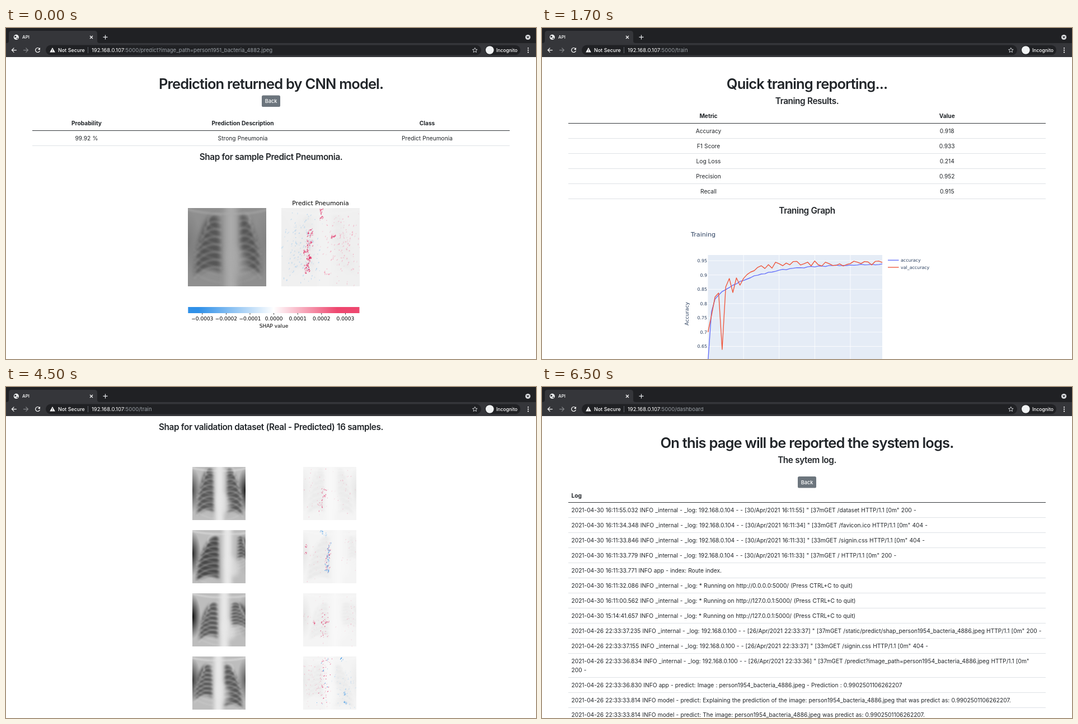
An HTML page with a canvas for the animation above (8 s loop, 947x592 px).

```html
<!DOCTYPE html>
<html lang="en">
<head>
<meta charset="utf-8">
<title>API</title>
<style>
  html, body { margin: 0; width: 100%; height: 100%; overflow: hidden; background: #fff; }
  #stage { position: relative; width: 947px; height: 592px; overflow: hidden; }
  .scene, svg, canvas { position: absolute; left: 0; top: 0; }
  .scene { opacity: 0; }
  text { font: 430 10.2px Inter, sans-serif; word-spacing: .3px; fill: #212529; white-space: pre; }
  .h1 { font-size: 25.5px; font-weight: 560; letter-spacing: -.035em; }
  .h4 { font-size: 15.3px; font-weight: 560; letter-spacing: -.026em; }
  .th { font-weight: 700; }
  .btn { font-size: 9.2px; font-weight: 500; fill: #fff; }
  .bar { font-size: 8.9px; fill: #9aa0a6; }
  .lit { fill: #fff; font-weight: 500; }
  .url { font-size: 9.5px; fill: #9aa0a6; word-spacing: 0; }
  .mpl { font: 9.04px "DejaVu Sans", sans-serif; fill: #000; word-spacing: 0; }
  .plot { font: 7.9px "DejaVu Sans", sans-serif; fill: #2a3f5f; word-spacing: 0; }
</style>
</head>
<body>
<div id="stage"></div>
<script>
const W = 947, H = 592, LOOP = 8000, MID = 473.5;
const STEPS = [[0, 'predict'], [500, 'train'], [2500, 'predict'], [4500, 'samples'], [6500, 'logs']];
const stage = document.getElementById('stage');

const text = (x, y, s, cls = '', anchor = 'middle', more = '') =>
  `<text x="${x}" y="${y}" class="${cls}" text-anchor="${anchor}" ${more}>${s}</text>`;
const rect = (x, y, w, h, fill, more = '') =>
  `<rect x="${x}" y="${y}" width="${w}" height="${h}" fill="${fill}" ${more}/>`;
const path = (d, stroke, width = 1, more = '') =>
  `<path d="${d}" fill="none" stroke="${stroke}" stroke-width="${width}" ${more}/>`;
const circle = (x, y, r, fill) => `<circle cx="${x}" cy="${y}" r="${r}" fill="${fill}"/>`;
const svg = body => `<svg width="${W}" height="${H}" viewBox="0 0 ${W} ${H}">${body}</svg>`;
const rule = (y, tone = '#dee2e6') => rect(47, y, 853, 1, tone);
const headRule = y => rule(y, '#33373b');
const button = y => rect(457, y, 33, 20.5, '#6c757d', 'rx="2.6"') + text(MID, y + 13.6, 'Back', 'btn');

function seeded(n) {
  return () => {
    n = (n + 0x6d2b79f5) | 0;
    let t = Math.imul(n ^ (n >>> 15), 1 | n);
    t = (t + Math.imul(t ^ (t >>> 7), 61 | t)) ^ t;
    return ((t ^ (t >>> 14)) >>> 0) / 4294967296;
  };
}

// Browser frame
function frame() {
  const dots = [36, 39.7, 43.4].map(y => circle(933, y, 1.1, '#fff')).join('');
  return rect(0, 0, W, 27, '#202124') + rect(0, 27, W, 25, '#35363a') +
    '<path d="M1 27q4 0 4-4V10q0-5 5-5h148q5 0 5 5v13q0 4 4 4z" fill="#35363a"/>' +
    circle(18.3, 16.4, 4.6, '#f1f3f4') +
    '<path d="M15 14.5l2.5-.8 1.2 1.8-1.4 1.6-2 .2zM18.5 18l2-.8 1 1.3-1.6 1.5z" fill="#35363a"/>' +
    text(29, 19.4, 'API', 'bar lit', 'start', 'style="font-size:8px"') +
    path('M150 14l5 5m0-5l-5 5', '#fff', 1.1) +
    path('M173.5 16.4h8M177.5 12.4v8', '#e8eaed', 1.2) +
    circle(932.5, 16.5, 4.6, '#d5d7da') + '<path d="M930 15.2h5l-2.5 3.2z" fill="#202124"/>' +
    path('M18.8 39.6h-8.4M14.4 35.6l-4 4 4 4', '#fff', 1.2) +
    path('M31 39.6h8.4M35.4 35.6l4 4-4 4', '#85878a', 1.2) +
    path('M59.7 36.9a4 4 0 1 0 .8 3.7', '#fff', 1.2) + '<path d="M61 35v4h-4z" fill="#fff"/>' +
    rect(71, 30.5, 778, 18, '#202124', 'rx="9"') +
    '<path d="M83 35l4.8 8.4h-9.6z" fill="#fff"/>' + path('M83 38v2.6m0 .8v1', '#202124', .9) +
    text(93, 42.8, 'Not Secure', 'bar lit', 'start') + rect(146, 34, 1, 11, '#5f6368') +
    path('M837.8 35.4l1.3 2.8 3 .3-2.3 2 .7 3-2.7-1.6-2.7 1.6.7-3-2.3-2 3-.3z', '#dadce0', .9) +
    rect(856, 30.8, 63, 17.4, '#202124', 'rx="8.7"') + circle(864.3, 39.5, 7.3, '#f1f3f4') +
    text(876, 42.8, 'Incognito', 'bar lit', 'start', 'style="font-size:8.5px"') + dots;
}
const address = tail =>
  text(153, 42.9, `<tspan fill="#fff">192.168.0.107</tspan>:5000/${tail}`, 'url', 'start');

// Chest pictures, in units of 0..100. Lung: [apex x, apex y, inner x, outer x, base y]
function lungPath([ax, ay, inX, outX, base]) {
  const p = new Path2D();
  p.moveTo(ax, ay);
  p.bezierCurveTo(ax + (outX - ax) * .45, ay, outX, base - 45, outX, base);
  p.quadraticCurveTo((inX + outX) / 2, base - 16, inX, base - 4);
  p.bezierCurveTo(inX, base - 30, inX, ay + 18, ax + (inX - ax) * .6, ay + 3);
  p.closePath();
  return p;
}

function sideShade(c, x, alpha) {
  const g = c.createRadialGradient(x, 40, 0, x, 40, 16);
  g.addColorStop(0, `rgba(0,0,0,${alpha})`);
  g.addColorStop(1, 'rgba(0,0,0,0)');
  c.save();
  c.translate(0, -60);
  c.scale(1, 2.6);
  c.fillStyle = g;
  c.fillRect(0, 0, 100, 100);
  c.restore();
}

function xray(c, o) {
  const px = c.getTransform().a;
  const blur = u => { c.filter = `blur(${u * px}px)`; };
  c.fillStyle = o.body;
  c.fillRect(0, 0, 100, 100);
  sideShade(c, 0, o.shade[0]);
  sideShade(c, 100, o.shade[1]);
  blur(3);
  c.fillStyle = o.lung;
  o.lungs.forEach(l => c.fill(lungPath(l)));
  blur(4);
  c.fillStyle = o.bright;
  c.fillRect(o.spine - 8, -10, 16, 120);
  c.globalAlpha = .6;
  c.beginPath(); c.ellipse(o.spine + 8, 68, 12, 20, -.3, 0, 7); c.fill();
  blur(1);
  c.strokeStyle = o.bright;
  c.lineCap = 'round';
  for (const [, ay, inX, outX, base] of o.lungs) {
    const mid = (inX + outX) / 2, gap = (base - ay) / 8;
    for (let i = 0; i < 8; i++) {
      const y = ay + i * gap, end = inX + (outX - inX) * Math.min(1, .5 + i * .13);
      c.globalAlpha = .28;
      c.lineWidth = 3.2;
      c.beginPath(); c.moveTo(inX, y); c.quadraticCurveTo(mid, y - 6, end, y + 12); c.stroke();
      c.globalAlpha = .15;
      c.beginPath(); c.moveTo(inX, y + 18); c.quadraticCurveTo(mid, y + 17, end, y + 6); c.stroke();
    }
    c.globalAlpha = .5;
    c.beginPath(); c.moveTo(o.spine, 7);
    c.quadraticCurveTo(mid, 9, outX + Math.sign(outX - inX) * 12, 1); c.stroke();
  }
  c.globalAlpha = 1;
  c.filter = 'none';
}

const RED = '#e0245e', PINK = '#f58aa8', BLUE = '#1e88e5', SKY = '#8fc4ef';

// Pale haze over each lung, a strong streak beside the spine, and a few hot spots
function specks(c, o, seed) {
  const rnd = seeded(seed), bell = () => rnd() + rnd() + rnd() - 1.5;
  const dot = (x, y, tone, r, alpha) => {
    c.fillStyle = tone;
    c.globalAlpha = alpha * (.3 + .7 * rnd());
    c.beginPath();
    c.ellipse(x, y, r * (.5 + rnd()), r * (.4 + rnd() * .4), -.6 - rnd(), 0, 7);
    c.fill();
  };
  o.lungs.forEach(([ax, ay, inX, outX, base], side) => {
    for (let i = 0; i < o.haze; i++)
      dot((inX + outX) / 2 + bell() * 26, (ay + base) / 2 + bell() * 45, o.pale[side], 1, .55);
  });
  const [x0, y0, x1, y1] = o.streak;
  for (let i = 0; i < o.strong; i++) {
    const k = rnd();
    dot(x0 + (x1 - x0) * k + bell() * o.wide, y0 + (y1 - y0) * k, rnd() < o.blue ? BLUE : RED, 1.05, .85);
  }
  for (const [x, y, tone] of o.spots)
    for (let i = 0; i < 9; i++) dot(x + bell() * 3, y + bell() * 4, tone, .95, .85);
  c.globalAlpha = 1;
}

function picture(parent, x, y, size, paint) {
  const cv = document.createElement('canvas'), c = cv.getContext('2d');
  cv.width = cv.height = size;
  cv.style.left = x + 'px';
  cv.style.top = y + 'px';
  c.scale(size / 100, size / 100);
  paint(c);
  parent.append(cv);
}

function pair(parent, x1, x2, y, size, chest, seed) {
  picture(parent, x1, y, size, c => xray(c, chest));
  picture(parent, x2, y, size, c => {
    xray(c, chest);
    c.fillStyle = 'rgba(250,250,250,.91)';
    c.fillRect(0, 0, 100, 100);
    specks(c, chest, seed);
  });
}

const MAIN = {
  body: '#8f8f8f', lung: '#555', bright: '#ababab', shade: [.15, .1], spine: 55,
  lungs: [[33, 9, 42, 9, 87], [66, 7, 66, 93, 87]],
  pale: [SKY, PINK], haze: 130, streak: [38, 26, 33, 84], strong: 75, wide: 4, blue: 0,
  spots: [[66, 37, RED], [51, 3, RED], [51, 12, RED], [34, 45, RED], [31, 56, RED], [58, 83, PINK]]
};
const bright = o => ({ body: '#bdbdbd', lung: '#585858', bright: '#e8e8e8', pale: [PINK, PINK], spots: [], ...o });
const SAMPLES = [
  bright({
    spine: 51, shade: [.6, .85], lungs: [[32, 2, 41, 9, 90], [68, 2, 65, 94, 92]],
    haze: 30, streak: [40, 40, 34, 84], strong: 30, wide: 8, blue: 0
  }),
  bright({
    spine: 66, shade: [.8, .1], lung: '#484848', lungs: [[46, 11, 50, 8, 96], [88, 11, 86, 106, 60]],
    haze: 24, streak: [49, 24, 45, 80], strong: 75, wide: 4, blue: .7,
    spots: [[5, 30, RED], [5, 42, RED], [35, 3, BLUE], [43, 10, SKY]]
  }),
  bright({
    spine: 60, shade: [.95, .3], lungs: [[42, 17, 48, 13, 88], [78, 17, 73, 107, 68]],
    haze: 28, streak: [38, 28, 40, 84], strong: 34, wide: 9, blue: 0, spots: [[21, 55, RED]]
  }),
  bright({
    spine: 49, shade: [.7, .5], lungs: [[28, 15, 38, 5, 82], [62, 15, 60, 94, 98]],
    pale: [PINK, SKY], haze: 60, streak: [43, 2, 38, 90], strong: 60, wide: 12, blue: .15,
    spots: [[72, 5, BLUE], [78, 70, BLUE], [80, 88, BLUE]]
  })
];

function predict() {
  const stops = [[6, '#2f90e8'], [50, '#fff'], [87, '#ee476f']]
    .map(([o, t]) => `<stop offset="${o}%" stop-color="${t}"/>`).join('');
  const ticks = [-3, -2, -1, 0, 1, 2, 3].map(n => {
    const x = 478.6 + n * 42.6;
    return rect(x - .4, 510, .8, 2.5, '#000') +
      text(x, 522.8, (n < 0 ? '\u2212' : '') + Math.abs(n / 1e4).toFixed(4), 'mpl');
  }).join('');
  const row = (y, cells, cls) => cells.map((s, i) => text([144, 423, 752.5][i], y, s, cls)).join('');
  return address('predict?image_path=person1951_bacteria_4882.jpeg') +
    text(MID, 109, 'Prediction returned by CNN model.', 'h1') + button(120.5) +
    row(173.7, ['Probability', 'Prediction Description', 'Class'], 'th') + headRule(183) +
    row(200.6, ['99.92 %', 'Strong Pneumonia', 'Predict Pneumonia']) + rule(210) +
    text(MID, 236, 'Shap for sample Predict Pneumonia.', 'h4') +
    text(562, 317, 'Predict Pneumonia', 'mpl', 'middle', 'style="font-size:10.85px"') +
    `<linearGradient id="scale">${stops}</linearGradient>` +
    rect(325.3, 499, 306.2, 11, 'url(#scale)') + ticks + text(478.5, 535.6, 'SHAP value', 'mpl');
}

// Chart heights per epoch: a settling curve with seeded jitter
function curves() {
  const rnd = seeded(5), jitter = a => (rnd() * 2 - 1) * a;
  const start = [544, 514, 481, 474, 575, 463, 448, 473, 447, 460];
  const epochs = [...Array(50).keys()];
  return {
    acc: epochs.map(i => 422 + 72 * Math.exp(-i / 11) + 103 * Math.exp(-1.7 * i) + jitter(1)),
    val: epochs.map(i => start[i] || 421 + 26 * Math.exp((10 - i) / 4) + jitter(i < 14 ? 1 : 5))
  };
}
const series = (ys, tone) => path(
  'M' + ys.map((y, i) => `${(296.5 + i * 6.36).toFixed(1)} ${y.toFixed(1)}`).join('L'), tone, 1.35, 'stroke-linejoin="round"');

function train() {
  const rows = [['Accuracy', '0.918'], ['F1 Score', '0.933'], ['Log Loss', '0.214'], ['Precision', '0.952'], ['Recall', '0.915']]
    .map(([k, v], i) => text(297.5, 188 + i * 27, k) + text(723.7, 188 + i * 27, v) + rule(197 + i * 27)).join('');
  let grid = '';
  for (let i = 0; i < 7; i++) {
    const y = 416.2 + i * 25.55;
    grid += rect(296.5, y - .4, 311.5, .8, '#fff') + text(295, y + 2.9, +(.95 - i * .05).toFixed(2), 'plot', 'end');
  }
  for (let i = 1; i < 5; i++) grid += rect(296.1 + i * 63.6, 406, .8, 186, '#fff');
  const key = (y, name, tone) => path(`M618 ${y}h19.5`, tone, 1.35) + text(641, y + 3, name, 'plot', 'start');
  const { acc, val } = curves();
  return address('train') + text(MID, 109, 'Quick traning reporting...', 'h1') +
    text(MID, 135.6, 'Traning Results.', 'h4') +
    text(297.5, 161, 'Metric', 'th') + text(723.7, 161, 'Value', 'th') + headRule(170) + rows +
    text(MID, 331.5, 'Traning Graph', 'h4') +
    text(266, 373, 'Training', 'plot', 'start', 'style="font-size:11.2px"') +
    rect(296.5, 406, 311.5, 186, '#e5ecf6') + grid +
    text(0, 0, 'Accuracy', 'plot', 'middle', 'style="font-size:9.2px" transform="translate(261.5 511) rotate(-90)"') +
    series(acc, '#636efa') + series(val, '#ef553b') +
    key(415.3, 'accuracy', '#636efa') + key(428, 'val_accuracy', '#ef553b');
}

const samples = () => address('train') +
  text(MID, 77, 'Shap for validation dataset (Real - Predicted) 16 samples.', 'h4');

function logs() {
  const web = (day, time, ip, call, code) =>
    `2021-04-${day} ${time} INFO _internal - _log: 192.168.0.${ip} - - [${day}/Apr/2021 ${time.slice(0, 8)}] ` +
    `" [${code === 404 ? 33 : 37}mGET ${call} HTTP/1.1 [0m"` + (code ? ` ${code} -` : '');
  const run = (time, host) =>
    `2021-04-30 ${time} INFO _internal - _log: * Running on http://${host}:5000/ (Press CTRL+C to quit)`;
  const img = 'person1954_bacteria_4886.jpeg', score = '0.9902501106262207';
  const model = '2021-04-26 22:33:33.814 INFO model - predict: ';
  const lines = [
    web(30, '16:11:55.032', 104, '/dataset', 200),
    web(30, '16:11:34.348', 104, '/favicon.ico', 404),
    web(30, '16:11:33.846', 104, '/signin.css', 404),
    web(30, '16:11:33.779', 104, '/', 200),
    '2021-04-30 16:11:33.771 INFO app - index: Route index.',
    run('16:11:32.086', '0.0.0.0'), run('16:11:00.562', '127.0.0.1'), run('15:14:41.657', '127.0.0.1'),
    web(26, '22:33:37.235', 100, '/static/predict/shap_' + img, 200),
    web(26, '22:33:37.155', 100, '/signin.css', 404),
    web(26, '22:33:36.834', 100, '/predict?image_path=' + img, 0) + '\n200 -',
    `2021-04-26 22:33:36.830 INFO app - predict: Image : ${img} - Prediction : ${score}`,
    `${model}Explaining the prediction of the image: ${img} that was predict as: ${score}.`,
    `${model}The image: ${img} was predict as: ${score}.`
  ];
  let y = 224.2, out = '';
  for (const line of lines) {
    line.split('\n').forEach((s, i) => {
      if (i) y += 15.8;
      out += text(52.5, y, s, '', 'start');
    });
    out += rule(Math.round(y + 9.2));
    y += 26.96;
  }
  return address('dashboard') + text(MID, 109, 'On this page will be reported the system logs.', 'h1') +
    text(MID, 135.6, 'The sytem log.', 'h4') + button(160) +
    text(52.5, 197.5, 'Log', 'th', 'start') + headRule(206) + out;
}

stage.innerHTML = svg(frame());
for (const [name, draw] of Object.entries({ predict, train, samples, logs })) {
  const el = document.createElement('div');
  el.className = 'scene';
  el.innerHTML = svg(draw());
  stage.append(el);
  if (name === 'predict') pair(el, 325, 492, 322, 140, MAIN, 7);
  if (name === 'samples') SAMPLES.forEach((s, i) => pair(el, 333, 531, 143 + i * 113, 95, s, 20 + i));
  const keys = STEPS.map(([t, on]) => ({ offset: t / LOOP, opacity: +(on === name), easing: 'step-end' }));
  el.animate([...keys, { ...keys[keys.length - 1], offset: 1 }], { duration: LOOP, iterations: Infinity });
}
</script>
</body>
</html>
```
